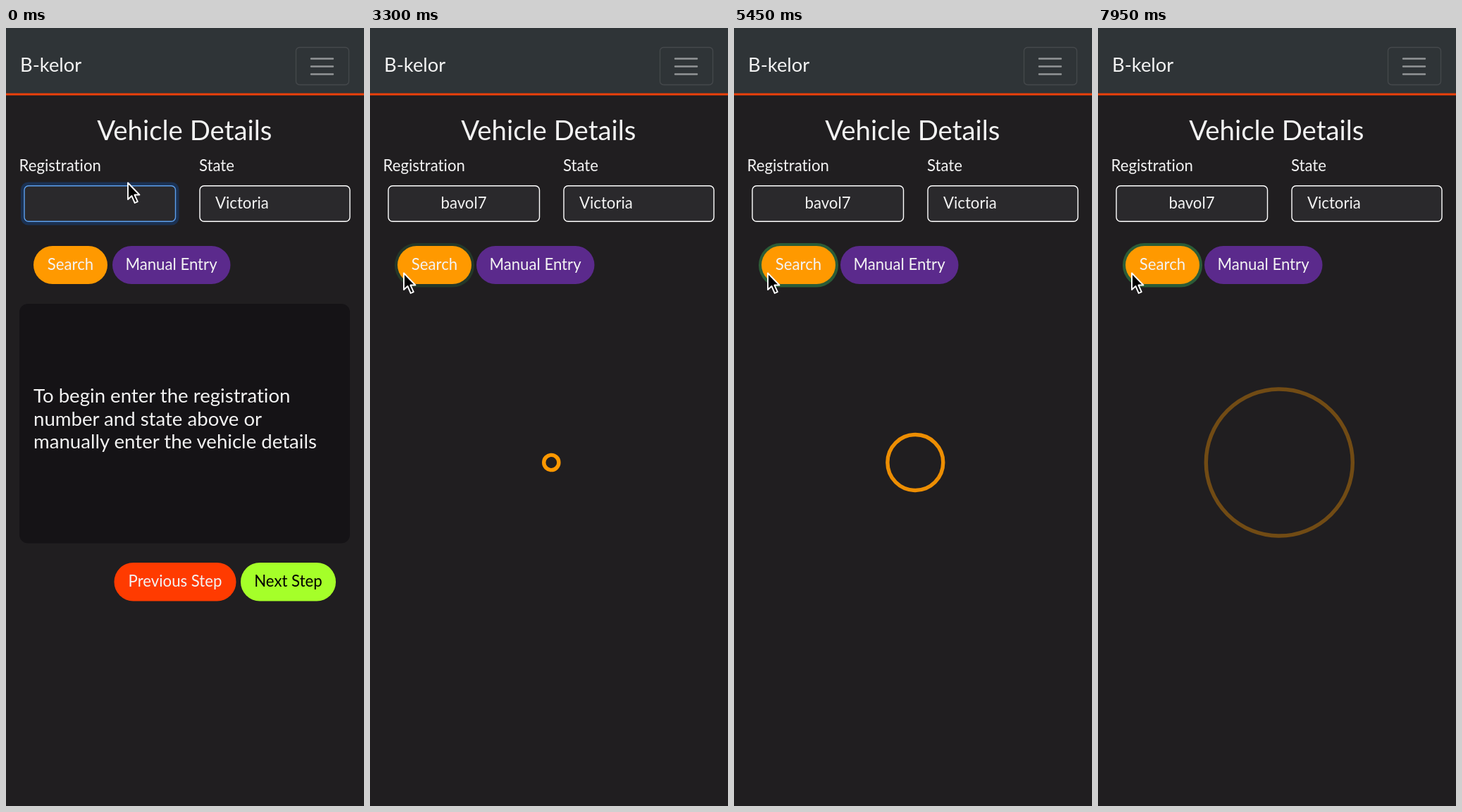
An HTML page for the animation above (8000 ms loop, 508 px wide and 1103 px high).

```html
<!DOCTYPE html>
<html lang="en">
<head>
<meta charset="utf-8">
<title>Vehicle Details</title>
<style>
  html, body { margin: 0; height: 100%; overflow: hidden; background: #201e20; }
  svg { display: block; width: 100vw; height: 100vh; }
  text { font: 22.2px Lato, "Open Sans", sans-serif; font-variant-ligatures: none; fill: #f3f3f3; }
  .brand { font-size: 27.3px; }
  .title { font-size: 38.4px; text-anchor: middle; }
  .hint { font-size: 27.6px; }
  .mid { text-anchor: middle; }
  .field { fill: #2a292c; stroke: #fff; stroke-width: 1.4; }
</style>
</head>
<body>
<svg viewBox="0 0 508 1103">
  <rect width="508" height="1103" fill="#201e20"/>
  <rect width="508" height="93" fill="#2f3437"/>
  <rect y="92.5" width="508" height="3" fill="#ec400a"/>
  <text class="brand" x="20" y="62">B-kelor</text>
  <rect x="411.5" y="27.5" width="75" height="53" rx="5" fill="none" stroke="#45494c" stroke-width="1.3"/>
  <path d="M433 43.5h31M433 54.5h31M433 65.5h31" stroke="#929597" stroke-width="2.4" stroke-linecap="round"/>

  <text class="title" x="253.3" y="159">Vehicle Details</text>
  <text x="18.5" y="203">Registration</text>
  <text x="274" y="203">State</text>

  <rect id="glow" x="23.5" y="221" width="219.5" height="56" rx="8" fill="none" stroke="#1b3152" stroke-width="5"/>
  <rect id="plate" class="field" x="26" y="223.7" width="214.5" height="50.6" rx="6"/>
  <text id="typed" class="mid" x="133" y="256"></text>
  <rect class="field" x="275" y="223.7" width="213" height="50.6" rx="6"/>
  <text x="297" y="256">Victoria</text>

  <rect id="ring" x="35" y="305" width="113" height="62.5" rx="31" fill="#2b5c37"/>
  <rect x="39" y="309" width="105" height="54" rx="27" fill="#ff9900"/>
  <text class="mid" x="91.5" y="343">Search</text>
  <rect x="151" y="309" width="167.5" height="54" rx="27" fill="#5b2a8c"/>
  <text class="mid" x="234.5" y="343">Manual Entry</text>

  <g id="form">
    <rect x="19" y="391" width="469" height="339.5" rx="12" fill="#151316"/>
    <text class="hint" x="39" y="531">To begin enter the registration</text>
    <text class="hint" x="39" y="563.5">number and state above or</text>
    <text class="hint" x="39" y="596">manually enter the vehicle details</text>
    <rect x="153.5" y="758" width="173" height="54.5" rx="27" fill="#ff3b00"/>
    <text class="mid" x="240" y="792">Previous Step</text>
    <rect x="333" y="758" width="135" height="54.5" rx="27" fill="#a5ff29"/>
    <text class="mid" x="400.5" y="792" style="fill:#000">Next Step</text>
  </g>

  <circle id="ripple" cx="257.3" cy="616" fill="none" stroke="#ff9900" stroke-width="5.4"/>
  <path id="pointer" d="M1 1.5V25l5.4-5 4.4 10 4-1.8-4.4-9.7h7z" fill="#000" stroke="#fff" stroke-width="1.9" stroke-linejoin="round"/>
</svg>
<script>
const LOOP = 8000, BLUR = 2280, SEARCH = 3285, FADE = 150;
const PLATE = "bavol7";
const $ = id => document.getElementById(id);
const [glow, plate, typed, ring, form, ripple, pointer] =
  ["glow", "plate", "typed", "ring", "form", "ripple", "pointer"].map($);

const clamp = v => Math.min(1, Math.max(0, v));
const smooth = v => v * v * (3 - 2 * v);
const ramp = (t, start, length) => smooth(clamp((t - start) / length));
const mix = (a, b, k) => a + (b - a) * k;

// cubic-bezier(0, .2, .8, 1), solved by bisection
function ease(x) {
  let lo = 0, hi = 1, s = 0.5;
  for (let i = 0; i < 20; i++) {
    s = (lo + hi) / 2;
    if (2.4 * (1 - s) * s * s + s ** 3 < x) lo = s; else hi = s;
  }
  return 0.6 * (1 - s) ** 2 * s + 3 * (1 - s) * s * s + s ** 3;
}

function draw(t) {
  const blur = ramp(t, BLUR, FADE);
  glow.style.opacity = 1 - blur;
  plate.style.stroke = `rgb(${mix(92, 255, blur)},${mix(160, 255, blur)},${mix(238, 255, blur)})`;
  typed.textContent = PLATE.slice(0, Math.max(0, Math.floor((t - 300) / 200)));

  const out = ramp(t, 1600, 550), back = ramp(t, 2600, 550);
  const x = mix(mix(172, 416, out), 47, back);
  const y = mix(mix(218, 338, out), 346, back);
  pointer.setAttribute("transform", `translate(${x} ${y})`);

  const loading = t >= SEARCH;
  ring.style.opacity = ramp(t, SEARCH - 50, FADE);
  form.style.display = loading ? "none" : "";
  ripple.style.display = loading ? "" : "none";
  if (loading) {
    const p = ease(((t - SEARCH) % 1000) / 1000);
    ripple.setAttribute("r", mix(2.7, 129.8, p));
    ripple.style.opacity = 1 - p * p;
  }
}

const start = performance.now();
function tick() {
  draw((performance.now() - start) % LOOP);
  requestAnimationFrame(tick);
}
tick();
</script>
</body>
</html>
```
